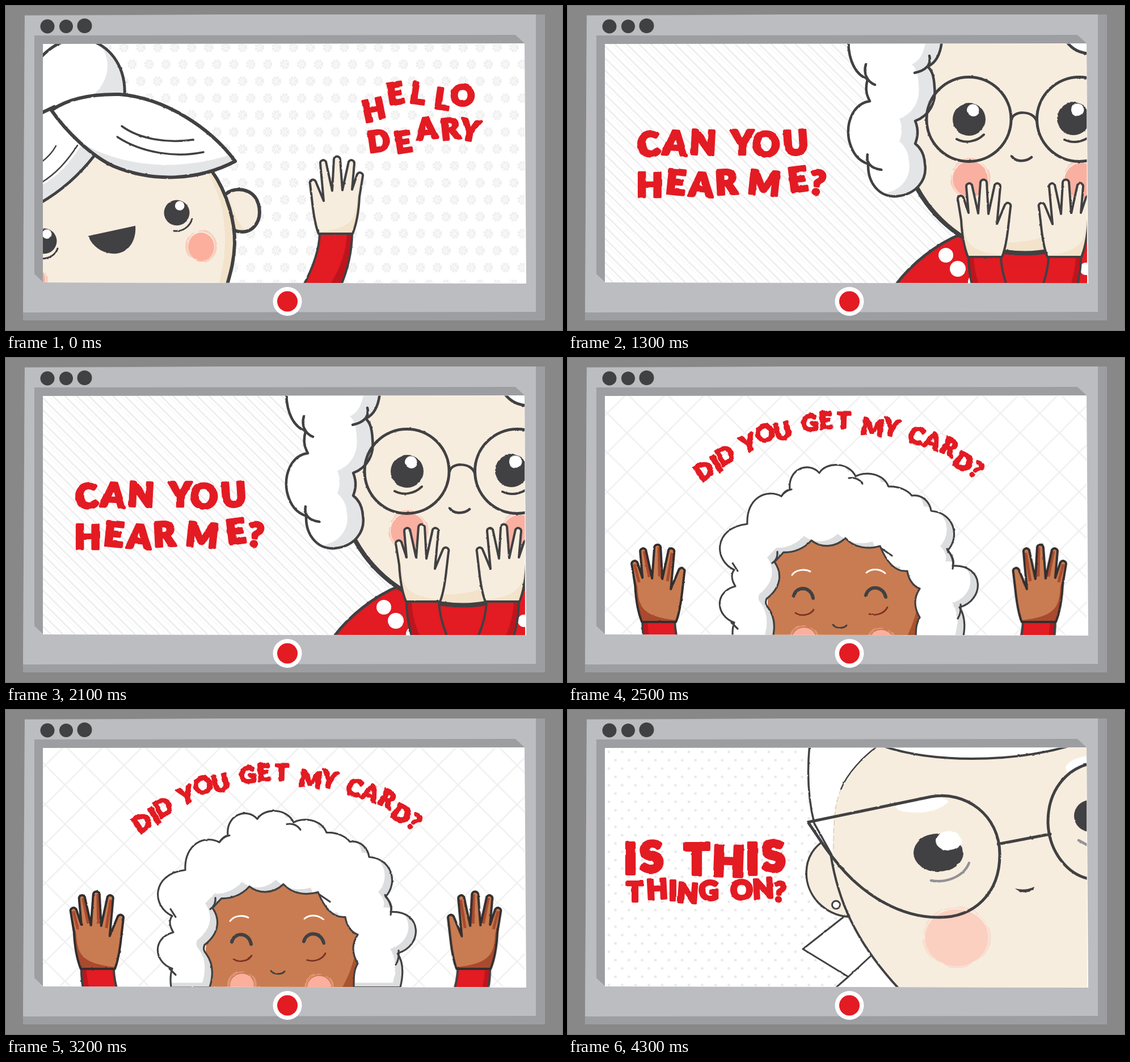
Animation, 980 px wide and 572 px high, one loop 4400 ms. Source, as an HTML page:

```html
<!DOCTYPE html>
<html lang="en">
<head>
<meta charset="utf-8">
<title>Video call</title>
<style>
  html, body { margin: 0; width: 100%; height: 100%; overflow: hidden; background: #888; }
  svg { display: block; width: 980px; height: 572px; }
  text { font-family: Lato, "Open Sans", sans-serif; font-weight: 900; text-anchor: middle;
         fill: #e31b23; stroke: #e31b23; stroke-linejoin: round; }
  .ink { fill: none; stroke: #414042; stroke-width: 5; stroke-linecap: round; stroke-linejoin: round; }
  .dark { fill: #414042; }
  .white { fill: #fff; }
  .grey { fill: #e4e5e7; }
  .skin { fill: #f7eddf; }
  .skinShade { fill: #f2e3ca; }
  .red { fill: #e31b23; }
</style>
</head>
<body>
<svg id="stage" viewBox="0 0 980 572" xmlns="http://www.w3.org/2000/svg"></svg>
<script>
const SCENE_MS = 1100, STEP_MS = 100;
const stage = document.getElementById('stage');

const fill = (cls, d) => `<path class="${cls}" d="${d}"/>`;
const ink = (d, width = 5, color = '#414042') =>
  `<path class="ink" d="${d}" style="stroke-width:${width};stroke:${color}"/>`;
const disc = (cls, x, y, rx, ry = rx) => `<ellipse class="${cls}" cx="${x}" cy="${y}" rx="${rx}" ry="${ry}"/>`;
const move = (x, y, body, id = '') => `<g id="${id}" transform="translate(${x} ${y})">${body}</g>`;

const eye = (x, y, r) => disc('dark', x, y, r) + disc('white', x + r * .23, y - r * .55, r * .37);

function cheek(x, y, rx, ry, color) {
  const ring = (grow, dash) => `<ellipse cx="${x}" cy="${y - 1}" rx="${rx + grow}" ry="${ry + grow}"
    fill="none" stroke="${color}" stroke-dasharray="${dash}"/>`;
  return `<ellipse cx="${x}" cy="${y}" rx="${rx}" ry="${ry}" fill="${color}"/>` + ring(2, '50 9') + ring(4, '38 30');
}

// Each spot is [centre x, centre y, rotation] of one letter.
function lettering(chars, size, weight, spots) {
  return `<g font-size="${size}" stroke-width="${weight}">` + [...chars].map((char, i) => {
    const [x, y, turn] = spots[i];
    return `<text transform="translate(${x} ${y}) rotate(${turn})" y="${size * .36}">${char}</text>`;
  }).join('') + '</g>';
}

// Shaded hair: the outline in grey with a shifted white copy clipped inside it.
const hair = (id, d, dx, dy, width, shade) => `
  <clipPath id="${id}"><path d="${d}"/></clipPath>
  <path d="${d}" fill="${shade}"/>
  <g clip-path="url(#${id})"><path class="white" d="${d}" transform="translate(${dx} ${dy})"/></g>
  ${ink(d, width)}`;

const HAND = `M-29,0C-37,-20 -40,-45 -41,-65L-47,-102A5.3,5.3 0 0 1 -37,-105L-28,-78L-32,-124
  A5.3,5.3 0 0 1 -22,-127L-11,-77L-7,-132A5.6,5.6 0 0 1 4,-132L7,-76L18,-127A5.3,5.3 0 0 1 28,-124
  L22,-58L36,-92A5.3,5.3 0 0 1 46,-88L41,-45C39,-30 36,-12 31,0Z`;
const SLEEVE = 'M-28,0C-28,30 -20,65 -8,92L58,92C42,62 30,30 29,0Z';

function arm(side, deep) {
  const [tone, shade] = deep ? ['#c97c51', '#a94a2f'] : ['#f7eddf', '#f2e3ca'];
  const fingers = deep
    ? `<path d="M-42,-102L-34,-70M-25,-125L-16,-80M1,-132L2,-80M24,-122L16,-72" fill="none" stroke="${shade}" stroke-width="5"/>` : '';
  return `<g transform="scale(${side} 1)">
    ${fill('red', SLEEVE)}
    <path fill="#be151d" d="M-28,0C-28,30 -20,65 -8,92L12,92C-8,60 -18,30 -19,0Z"/>
    ${ink(SLEEVE, 4)}
    <path d="${HAND}" fill="${tone}"/>${fingers}
    <path d="M-29,0C-37,-20 -40,-45 -41,-65L-45,-92L-37,-62C-35,-26 -28,-10 31,-3L31,0Z" fill="${shade}"/>
    ${ink(HAND, 4, deep ? '#332e2e' : '#414042')}</g>`;
}

const backdrop = name => `<rect x="65" y="67" width="849" height="422" fill="url(#${name})"/>`;
const scene = (name, art, words) => `<g class="scene" display="none">${backdrop(name)}
  <g filter="url(#brush)">${art}</g><g class="boil">${words}</g></g>`;

const flower = (x, y) => `<circle cx="${x}" cy="${y}" r="5.6" fill="none" stroke="#eeeeef" stroke-width="6"
  stroke-dasharray="3.1 1.3"/><circle cx="${x}" cy="${y}" r="1.5" fill="#eeeeef"/>`;

const rough = (id, frequency, scale, seed) => `
  <filter id="${id}" filterUnits="userSpaceOnUse" x="-500" y="-200" width="1700" height="1000" color-interpolation-filters="sRGB">
    <feTurbulence type="fractalNoise" baseFrequency="${frequency}" numOctaves="2" seed="${seed}"/>
    <feDisplacementMap in="SourceGraphic" scale="${scale}" xChannelSelector="R" yChannelSelector="G"/>
  </filter>`;

const defs = `<defs>
  ${rough('brush', .12, 2, 4)}${rough('soft', .05, 3, 2)}${rough('worn', .09, 5.5, 9)}
  <clipPath id="screen"><path d="M65,67L914,66.5L915,489.5L65,488Z"/></clipPath>
  <pattern id="flowers" patternUnits="userSpaceOnUse" x="200" y="58" width="29.9" height="59.8">
    ${flower(7.5, 15)}${flower(22.45, 44.9)}</pattern>
  <pattern id="stripes" patternUnits="userSpaceOnUse" width="20" height="15" patternTransform="rotate(45)">
    <path d="M0,4H20" stroke="#ebebec" stroke-width="2.4"/><path d="M0,10H20" stroke="#f3f3f3"/></pattern>
  <pattern id="lattice" patternUnits="userSpaceOnUse" width="49" height="49" patternTransform="rotate(45)">
    <path d="M0,20H49M20,0V49" stroke="#f0f0f1" stroke-width="2.5"/></pattern>
  <pattern id="dots" patternUnits="userSpaceOnUse" x="66" y="67" width="23.5" height="29.4">
    <circle cx="6" cy="7" r="2.3" fill="#e8e8e9"/><circle cx="17.7" cy="21.7" r="2.3" fill="#e8e8e9"/></pattern>
</defs>`;

const monitor = `
  <path fill="#9d9ea1" d="M33,16L950,15V555L30,555V540Z"/>
  <path fill="#bcbdc0" d="M33,17L370,15L934,15V540L30,541Z"/>
  <path fill="#9d9ea1" d="M50,52L898,51L914,66V70H66V488L50,473Z"/>
  <path class="white" d="M65,67L914,66L917,490L65,488Z"/>
  ${disc('dark', 73, 36, 12.5)}${disc('dark', 106, 36, 12)}${disc('dark', 138.5, 35, 13)}
  ${disc('white', 496, 521.5, 25.5)}${disc('red', 496, 521.5, 18)}`;

const BUN = 'M60,92C75,76 90,66 105,62L152,62C185,74 212,108 209,160';
const FRINGE = 'M80,184C110,163 150,155 200,156C280,162 360,215 404,274C340,308 260,312 190,283C150,265 105,220 80,184Z';
const EAR = 'M389,331C398,323 419,320 434,332C448,344 451,370 441,385C433,398 418,402 402,396';
const hello = scene('flowers', `
  ${fill('white', BUN + 'L60,200Z')}
  ${fill('grey', 'M168,72C188,98 180,138 150,160L210,160C211,115 192,85 168,72Z')}
  ${ink(BUN)}
  ${fill('skin', EAR + 'Z')}${fill('skinShade', 'M393,340C402,360 404,380 425,399L402,396Z')}${ink(EAR, 6)}
  ${fill('skin', 'M60,350L155,262L362,292C392,332 404,385 403,420C402,450 396,470 389,495H60Z')}
  ${fill('skinShade', 'M350,285C393,350 393,430 374,495H389C396,470 402,450 403,420C404,385 392,332 362,292Z')}
  ${ink('M362,290C392,332 404,385 403,420C402,450 396,470 389,495', 6)}
  ${fill('white', 'M60,192L80,184L155,264C130,295 100,325 60,348Z')}
  ${fill('grey', 'M132,247C110,280 90,302 60,318V348C100,325 130,295 155,264Z')}
  ${ink('M155,265C130,297 100,325 60,348')}
  ${ink('M126,246C107,275 88,296 62,312M88,247C82,258 74,267 63,275', 2.5)}
  ${fill('white', 'M60,192L80,184L150,160L90,190Z')}${ink('M60,190C68,186 75,183 85,178', 6)}
  ${fill('white', FRINGE)}
  ${fill('grey', 'M404,274C340,308 260,312 190,283C170,274 148,258 130,240C210,288 310,290 394,263Z')}
  ${ink(FRINGE, 6)}
  ${ink('M204,212C235,235 285,243 330,236M196,231C240,260 300,268 348,258', 3.5)}
  ${eye(301, 365, 22.5)}${eye(67, 415, 22.5)}
  ${ink('M296,397C312,399 324,389 328,376M62,446C78,446 88,438 91,428', 3)}
  ${fill('dark', 'M145,406L228,388C230,412 218,434 195,437C172,439 152,425 145,406Z')}
  ${cheek(344, 425, 23, 25, '#fbaf9c')}${cheek(52, 482, 17, 20, '#fbaf9c')}
  ${move(582, 402, arm(-1), 'wave')}`,
  lettering('HELLODEARY', 51, 4, [
    [648, 183, -12], [686, 154, -9], [726, 154, 8], [769, 164, 8], [805, 158, 0],
    [657, 238, -8], [700, 240, -9], [741, 216, -5], [783, 217, -6], [818, 219, 10]]));

const CURLS = `M494,60C494,98 508,122 528,129C524,145 525,155 532,168C503,172 490,205 495,235C501,262 513,273 529,279
  C528,314 550,338 579,336C613,333 634,308 629,278C628,262 621,250 612,243C618,228 617,215 612,203
  C638,193 649,170 646,143C645,125 642,114 634,107C649,100 657,85 659,60Z`;
const CHIN = 'M605,300C630,360 690,425 770,434C830,442 870,432 925,400';
const SHOULDER = 'M578,492C605,455 650,420 692,403';
const hear = scene('stripes', `
  ${fill('red', SHOULDER + 'L925,403V495Z')}${ink(SHOULDER)}
  ${disc('white', 666, 440, 13)}${disc('white', 687, 464, 14)}${disc('white', 717, 487, 12)}${disc('white', 913, 464, 11)}
  ${fill('skin', CHIN + 'V60H600Z')}
  ${fill('skinShade', 'M676,395C740,425 810,425 870,395L890,415C860,434 830,440 770,434C735,430 700,415 676,395Z')}
  ${ink(CHIN, 8)}
  ${fill('white', 'M878,62C890,78 902,83 925,85V60Z')}${ink('M878,62C890,78 902,83 925,85')}
  ${cheek(709, 305, 31, 31, '#f9b0a0')}${cheek(906, 308, 31, 31, '#f9b0a0')}
  ${hair('curls', CURLS, -28, -4, 4.5, '#e4e5e7')}
  ${ink('M525,103C520,120 528,134 541,139M528,262C525,278 535,287 552,289M637,88C641,104 630,114 611,118', 4.5)}
  <circle class="ink" cx="706.5" cy="200" r="74.5"/><circle class="ink" cx="901" cy="200" r="74.5"/>
  ${ink('M782,200C785,184 820,184 826,203M782,265C788,275 806,276 817,267', 4.5)}
  <g class="boil">${eye(707, 200, 29)}${eye(891, 199, 29)}</g>
  ${ink('M685,235C700,243 720,240 733,227M875,236C890,243 905,240 918,232', 4)}
  <g id="lift">${move(734, 443, arm(1))}${move(876, 443, arm(-1))}</g>`,
  lettering('CANYOUHEARME?', 59, 4.5, [
    [142, 244, -5], [189, 242, 4], [238, 241, 3], [307, 241, 0], [349, 244, 4], [401, 241, -4],
    [144, 316, 0], [190, 311, 6], [235, 315, 4], [279, 311, -3], [346, 312, 6], [405, 306, -7], [440, 312, 6]]));

const PERM = `M291,500C289,485 290,475 293,467C260,455 257,413 295,403C287,390 288,380 293,374
  C257,358 255,300 316,293C314,247 350,230 376,244C381,236 386,233 391,232C387,195 425,182 443,203
  C455,183 495,183 507,209C522,200 555,202 565,227C585,226 600,235 606,243C625,240 638,255 640,270
  C680,273 692,315 669,340C679,350 681,360 678,367C735,364 735,428 690,440C702,458 700,480 695,500
  H613C613,480 613,470 620,458C611,443 608,425 620,407C608,403 600,390 598,376C578,378 562,362 550,332
  C530,338 505,336 489,318C470,336 445,335 429,322C415,338 395,344 380,343C375,348 370,354 364,360
  C378,380 376,405 350,425C347,432 349,437 353,441C363,455 367,475 359,500Z`;
const card = scene('lattice', `<g id="rise">
  <path fill="#c97c51" d="M350,500L355,330L420,310H560L618,370V500Z"/>
  <path fill="#a9532f" d="M618,432C610,465 602,485 590,505H618Z"/>
  ${cheek(416, 496, 21, 20, '#fbaf9c')}${cheek(552, 500, 21, 20, '#fbaf9c')}
  ${ink('M395,383C402,373 418,372 427,377M526,379C535,371 550,372 559,380', 3, '#fff')}
  ${ink('M398,420C402,402 428,402 432,424M525,419C530,400 556,402 560,422', 6)}
  ${ink('M401,450C410,457 428,454 433,444M531,452C545,456 558,450 563,440', 2.8, '#7b3321')}
  ${ink('M467,471C472,478 486,478 491,472', 3)}
  ${hair('perm', PERM, -13, -8, 3.2, '#dcddde')}
  ${ink('M376,244C382,236 388,233 394,232M495,212C505,210 514,214 519,222M290,362L299,376M288,467L299,478M369,342C370,352 366,358 360,362M552,336L571,349M668,337C676,348 681,358 678,372M692,435C693,446 691,454 687,460', 3.2)}
  </g>${move(159, 466, arm(1, true), 'leftHand')}${move(832, 466, arm(-1, true), 'rightHand')}`,
  lettering('DIDYOUGETMYCARD?', 41, 3, [
    [240, 199], [262, 187], [277, 172], [318, 150], [347, 133], [378, 129], [426, 115], [454, 110],
    [486, 110], [537, 122], [570, 123], [614, 137], [643, 146], [672, 157], [697, 183], [720, 197]
  ].map(([x, y]) => [x, y, (x - 478) * .14])));

const LENS = 'M423,198L640,153C700,142 761,185 761,255C761,325 715,366 655,366C590,367 520,330 468,262C450,240 440,222 423,198Z';
const LOBE = 'M445,235C412,262 413,310 441,340C460,359 478,364 494,365';
const JAW = 'M463,255C475,330 502,405 585,494';
const COLLAR = 'M485,366L414,422L494,471L535,433';
const thing = scene('dots', `
  ${fill('white', 'M426,60C421,110 424,160 434,200L465,256L560,60Z')}
  ${ink('M426,60C421,110 424,160 434,200L465,256', 3.5)}
  ${fill('white', 'M470,492L494,471L535,433L590,495Z')}${ink('M470,492L494,471', 3)}
  ${fill('white', COLLAR + 'Z')}${ink(COLLAR, 3)}
  ${fill('skin', LOBE + 'L463,255Z')}${ink(LOBE, 3.5)}
  <circle cx="472.5" cy="344" r="7" fill="#fff" stroke="#414042" stroke-width="3"/>
  ${fill('skin', 'M550,60C505,90 470,140 468,200L466,255C475,330 502,405 585,494H925V60Z')}
  ${ink(JAW, 4)}${ink('M548,62C520,82 492,112 481,140', 2.5)}
  <path d="M481,140C470,165 468,200 468,250" fill="none" stroke="#cdbfa9" stroke-dasharray="9 5"/>
  ${fill('white', 'M550,60C640,94 780,94 890,62Z')}${ink('M550,62C640,94 780,94 890,62', 4)}
  ${cheek(685, 402, 56, 50, '#fbd0c1')}
  ${fill('white', 'M575,169L632,156C650,150 672,158 670,163C655,175 640,182 610,181C590,180 580,178 575,169Z')}
  ${fill('white', 'M877,100C885,88 900,83 918,81V95C900,99 890,110 878,108Z')}
  ${ink(LENS)}${ink('M762,236L850,219M918,95C880,105 845,140 846,200C848,250 880,290 918,298')}
  <g class="boil">${disc('dark', 653, 252, 44, 34)}${disc('white', 671, 231, 23, 17)}</g>
  ${disc('dark', 920, 187, 28)}
  ${ink('M640,301C665,306 697,295 707,270M900,230L918,240', 4.5, '#929295')}
  ${fill('dark', 'M788,315C800,318 812,317 822,312L820,318C810,323 798,324 788,315Z')}`,
  lettering('ISTHIS', 73, 6, [[110, 263, 0], [147, 259, -3], [227, 264, 0], [283, 267, 2], [325, 263, 0], [362, 258, -3]]) +
  lettering('THINGON?', 48, 4, [[118, 321, 0], [157, 316, -3], [185, 319, 0], [211, 323, 4], [248, 319, 0],
    [306, 318, 0], [344, 315, -3], [373, 321, 4]]));

stage.innerHTML = defs + '<rect width="980" height="572" fill="#888"/>' + monitor +
  `<g clip-path="url(#screen)">${hello}${hear}${card}${thing}</g>`;

const scenes = [...stage.querySelectorAll('.scene')];
const boilOrder = [['soft', 'worn'], ['worn', 'soft'], ['soft', 'worn'], ['worn', 'soft']];
const place = (id, x, y) => document.getElementById(id).setAttribute('transform', `translate(${x} ${y})`);
const sway = (t, peak) => Math.cos((t - peak) / 900 * 2 * Math.PI);

const poses = [
  t => place('wave', 582 - 6 * t / 700, 402),
  t => place('lift', 0, -13 * (t - 200) / 800),
  t => {
    const climb = (t - 300) / 700;
    place('rise', 0, -10.5 * climb);
    place('leftHand', 157.5 - 3.5 * sway(t, 600), 466 - 9 * climb);
    place('rightHand', 830 + 5 * sway(t, 500), 466 - 9 * climb);
  },
  () => {}
];

let shown = -1;
function draw() {
  const step = Math.floor(performance.now() / STEP_MS) % (4 * SCENE_MS / STEP_MS);
  if (step !== shown) {
    shown = step;
    const time = step * STEP_MS, current = Math.floor(time / SCENE_MS), local = time % SCENE_MS;
    scenes.forEach((g, i) => g.setAttribute('display', i === current ? 'inline' : 'none'));
    // The lettering is redrawn on every second step.
    const edge = boilOrder[current][Math.floor(local / 200) % 2];
    scenes[current].querySelectorAll('.boil').forEach(g => g.setAttribute('filter', `url(#${edge})`));
    poses[current](local);
  }
  requestAnimationFrame(draw);
}
draw();
</script>
</body>
</html>
```
